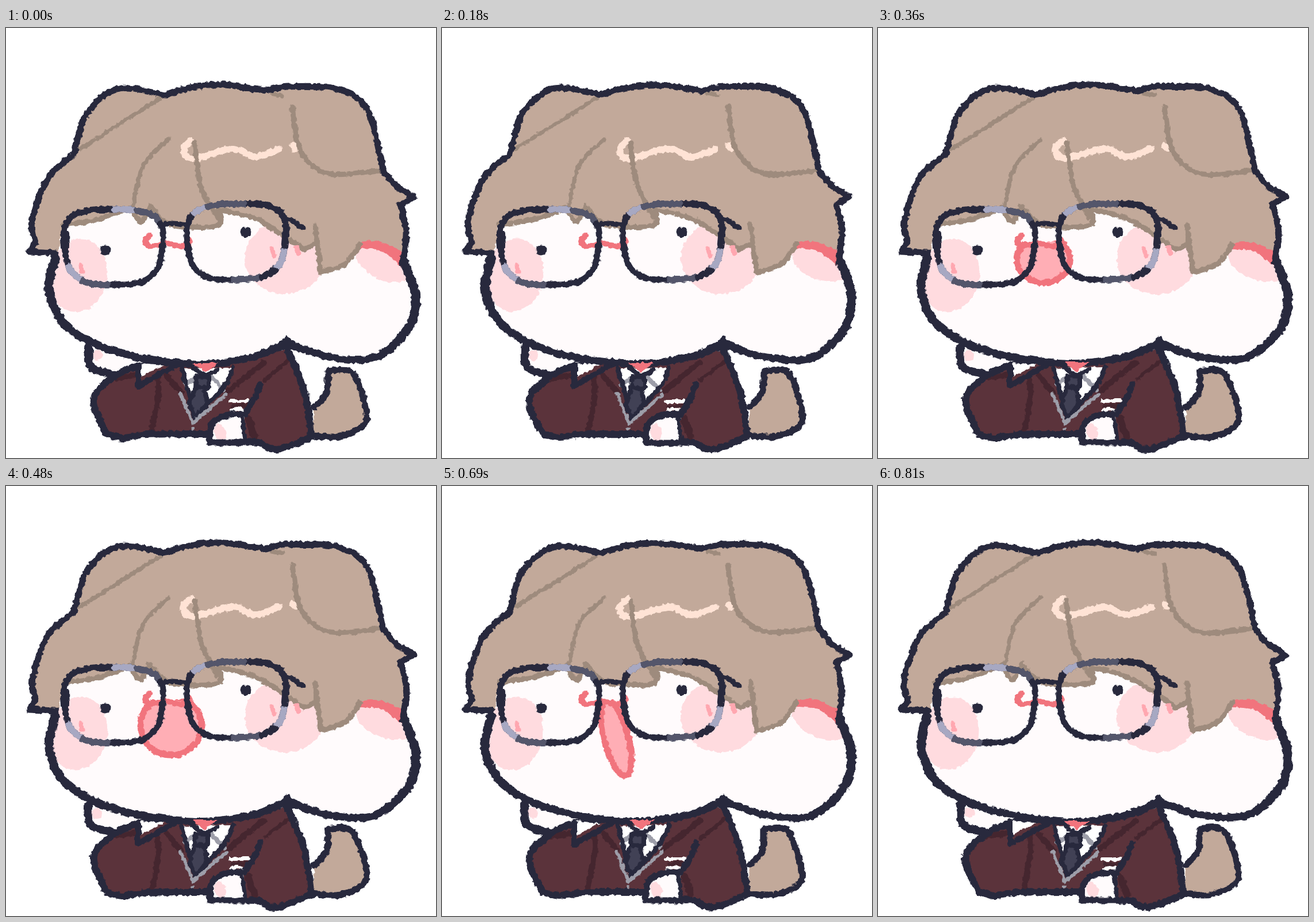
An HTML page with a canvas that plays this animation: 748x748 px, repeating every 0.87 s.

```html
<!DOCTYPE html>
<html lang="en">
<head>
<meta charset="utf-8">
<title>Chatty puppy</title>
<style>
html, body { margin: 0; width: 100%; height: 100%; overflow: hidden; background: #fff; }
canvas { display: block; width: 748px; height: 748px; }
</style>
</head>
<body>
<canvas id="stage" width="748" height="748"></canvas>
<script>
const SIZE = 748, LOOP = 870, BOIL = 180, TAU = Math.PI * 2;
const INK = '#28293d', HAIR = '#c2a99a', SHADE = '#9e8b7d', SKIN = '#fffbfc', BLUSH = '#ffdbdf',
  RED = '#f1747d', PINK = '#ffaeb5', COAT = '#5b333b', FOLD = '#45262f', TIE = '#414155',
  GRAY = '#9d9ea9', GLINT = '#a7a8c2', RIM = '#54566b', CREAM = '#ffe3d5';

// Smooth curve through "x,y" points; "|" marks a sharp corner.
function trace(spec) {
  const path = new Path2D();
  let last = null;
  for (const part of spec.split('|')) {
    const pts = part.split(' ').map(p => p.split(',').map(Number));
    if (last) pts.unshift(last);
    else path.moveTo(...pts[0]);
    for (let i = 0; i < pts.length - 1; i++) {
      const a = pts[i], b = pts[i + 1], before = pts[i - 1] || a, after = pts[i + 2] || b;
      path.bezierCurveTo(
        a[0] + (b[0] - before[0]) / 6, a[1] + (b[1] - before[1]) / 6,
        b[0] - (after[0] - a[0]) / 6, b[1] - (after[1] - a[1]) / 6, b[0], b[1]);
    }
    last = pts[pts.length - 1];
  }
  return path;
}

function layer() {
  const canvas = document.createElement('canvas');
  canvas.width = canvas.height = SIZE;
  const ctx = canvas.getContext('2d', { willReadFrequently: true });
  ctx.lineCap = ctx.lineJoin = 'round';
  return ctx;
}

const fill = (ctx, color, spec) => { ctx.fillStyle = color; ctx.fill(trace(spec)); };
function line(ctx, color, width, ...specs) {
  ctx.strokeStyle = color;
  ctx.lineWidth = width;
  for (const spec of specs) ctx.stroke(trace(spec));
}
function oval(ctx, color, x, y, rx, ry, tilt = 0) {
  ctx.fillStyle = color;
  ctx.beginPath();
  ctx.ellipse(x, y, rx, ry, tilt, 0, TAU);
  ctx.fill();
}

function noise(seed, cell) {
  const cols = Math.ceil(SIZE / cell) + 2;
  let s = seed * 7919 + 17;
  const grid = Float32Array.from({ length: cols * cols }, () => {
    s = (Math.imul(s, 1664525) + 1013904223) >>> 0;
    return s / 2147483648 - 1;
  });
  return (x, y) => {
    const u = x / cell, v = y / cell, i = u | 0, j = v | 0, fx = u - i, fy = v - j, n = j * cols + i;
    const top = grid[n] + (grid[n + 1] - grid[n]) * fx;
    const low = grid[n + cols] + (grid[n + cols + 1] - grid[n + cols]) * fx;
    return top + (low - top) * fy;
  };
}

// Ragged brush edges: every pixel is fetched from a slightly shifted place.
function roughen(source, seed, sway) {
  const fineX = noise(seed, 4), fineY = noise(seed + 50, 4);
  const wideX = noise(seed + 100, 48), wideY = noise(seed + 150, 48);
  const from = new Uint32Array(source.getImageData(0, 0, SIZE, SIZE).data.buffer);
  const out = layer(), image = out.createImageData(SIZE, SIZE);
  const to = new Uint32Array(image.data.buffer);
  const clamp = n => Math.max(0, Math.min(SIZE - 1, Math.round(n)));
  for (let y = 0, i = 0; y < SIZE; y++) {
    for (let x = 0; x < SIZE; x++, i++) {
      const sx = clamp(x + fineX(x, y) * 2.2 + wideX(x, y) * sway);
      const sy = clamp(y + fineY(x, y) * 2.2 + wideY(x, y) * sway);
      to[i] = from[sy * SIZE + sx];
    }
  }
  out.putImageData(image, 0, 0);
  return out.canvas;
}

function drawTail(ctx) {
  const tail = '535,660 557,635 560,597|600,598 622,645|625,688 580,711 533,709';
  fill(ctx, HAIR, tail);
  line(ctx, INK, 11, tail);
}

function drawCoat(ctx) {
  const coat = '490,560|518,630 531,711|472,733 440,721|355,718|352,706|' +
    '245,707 205,713 175,706|152,645 192,603 228,588|300,575';
  const paw = '144,555 148,590 185,602|228,587|225,555';
  fill(ctx, SKIN, paw);
  oval(ctx, BLUSH, 159, 569, 9, 10);
  line(ctx, INK, 14, '144,555 148,590 185,602');
  fill(ctx, COAT, coat);
  line(ctx, FOLD, 10, '190,609 224,604', '264,608 265,640 254,700', '280,605 305,634', '448,582 385,632');
  line(ctx, FOLD, 7, '492,579 450,612', '395,658 420,657');
  line(ctx, INK, 12, coat);
  fill(ctx, '#fff', '232,583|275,586|232,608');
  line(ctx, INK, 10, '230,585 230,623|300,583');
}

function drawShirt(ctx) {
  const vee = '306,592 329,678|380,622 395,590';
  const tie = '330,606|352,607|352,624|346,630|351,652|330,679|319,654|329,625|330,606';
  fill(ctx, '#fff', vee);
  line(ctx, GRAY, 8, '312,620 326,611', '356,606 379,629');
  line(ctx, INK, 8, vee, '326,592 346,603 368,594');
  fill(ctx, TIE, tie);
  line(ctx, INK, 8, tie, '330,625 350,626');
  line(ctx, GRAY, 6, '304,636 325,688|383,637');
  oval(ctx, GRAY, 324, 697, 3, 3);
  line(ctx, '#fff', 6, '390,649 422,649', '393,665 403,662 413,665');
}

function drawHand(ctx) {
  const hand = '355,721 359,689 385,673 415,672';
  line(ctx, FOLD, 13, '422,680 432,710');
  fill(ctx, SKIN, hand + '|415,721');
  oval(ctx, BLUSH, 373, 703, 10, 15, -.3);
  line(ctx, INK, 11, hand + '|432,645 442,620', '355,721 440,721');
  line(ctx, INK, 7, '411,678 416,716');
}

function drawFace(ctx) {
  const jaw = '85,400 76,460 110,522 200,565 330,584 430,572 489,548|560,572 642,573 700,523 712,463 691,404';
  const face = jaw + '|690,300|95,310';
  fill(ctx, SKIN, face);
  ctx.save();
  ctx.clip(trace(face));
  oval(ctx, BLUSH, 126, 430, 50, 64, .18);
  oval(ctx, BLUSH, 485, 400, 70, 63);
  oval(ctx, BLUSH, 662, 404, 55, 35, .36);
  ctx.restore();
  // A sideways shift thickens the cheeks but not the chin.
  for (const shift of [-2, 2]) {
    ctx.save();
    ctx.translate(shift, 0);
    line(ctx, INK, 12, jaw);
    ctx.restore();
  }
  fill(ctx, INK, '465,561|489,535|512,560');
  fill(ctx, RED, '324,582|369,582|345,598');
}

function drawHair(ctx) {
  const head = '86,391|40,389|51,373|46,335 72,262 118,219|137,154 172,116 210,104 278,116|320,104 380,99 450,109|' +
    '490,102 575,106 628,142 656,249|680,276 709,294|686,307|696,355 690,408';
  const fringe = '616,376|590,411 547,425|541,374|518,386|440,335 370,316|367,344 285,341 250,310|234,337 216,312|160,333 100,342';
  fill(ctx, HAIR, head + '|652,382 ' + fringe + '|90,392');
  fill(ctx, RED, '617,373 650,372 690,389|689,413 655,389 617,384');
  line(ctx, CREAM, 12, '322,196 309,212 326,227 393,210 432,224 475,211', '499,205 503,210');
  line(ctx, SHADE, 7, '283,194 239,240 221,310', '128,210 180,178 268,122', '462,114 480,118');
  line(ctx, SHADE, 9, fringe, '537,342 541,374', '328,200 340,275 368,330', '498,137 512,213 560,253 653,247');
  line(ctx, INK, 11, head);
}

// Rounded lens outline between two angles in degrees.
function rim(ctx, color, [cx, cy, tilt], from = 0, to = 360) {
  const n = 3.1, taper = .08;
  ctx.beginPath();
  for (let deg = from; deg <= to; deg++) {
    const c = Math.cos(deg * TAU / 360), s = Math.sin(deg * TAU / 360);
    const r = (Math.abs(c) ** n + Math.abs(s) ** n) ** (-1 / n);
    const x = 85 * r * c * (1 - taper * r * s);
    ctx.lineTo(cx + x, cy + 66 * r * s + x * tilt);
  }
  ctx.strokeStyle = color;
  ctx.lineWidth = 11;
  ctx.lineCap = 'butt';
  ctx.stroke();
  ctx.lineCap = 'round';
}

function drawGlasses(ctx) {
  const left = [187, 381, 0], right = [401, 372, -.03];
  rim(ctx, INK, left);
  rim(ctx, INK, right);
  rim(ctx, GLINT, left, -92, -68);
  rim(ctx, RIM, left, -68, -37);
  rim(ctx, RIM, left, 94, 130);
  rim(ctx, GLINT, left, 130, 155);
  rim(ctx, GLINT, right, -138, -122);
  rim(ctx, RIM, right, -122, -79);
  rim(ctx, GLINT, right, 13, 40);
  rim(ctx, RIM, right, 62, 97);
  line(ctx, INK, 14, '102,358 103,382');
  line(ctx, INK, 9, '271,343 290,339 313,342', '479,325 517,347');
}

function drawMouth(ctx, [x, y, rx, ry, tilt]) {
  ctx.save();
  ctx.beginPath();
  ctx.rect(0, 371, SIZE, SIZE);
  ctx.clip();
  oval(ctx, PINK, x, y, rx, ry, tilt);
  ctx.strokeStyle = RED;
  ctx.lineWidth = 11;
  ctx.stroke();
  ctx.restore();
}

function drawFeatures(ctx, mouth) {
  line(ctx, '#ffa7b0', 9, '131,414 132,424', '463,386 467,397', '505,382 508,391');
  if (mouth) drawMouth(ctx, mouth);
  line(ctx, RED, 10, '250,362 241,371 252,380 270,376', '279,373 305,380 317,377 319,369');
  for (const [x, y] of [[173, 386], [417, 355]]) oval(ctx, INK, x, y, 9.5, 8.5);
  drawGlasses(ctx);
}

// Mouth poses: centre, radii, tilt.
const small = [286, 385, 28, 16, 0], half = [288, 403, 46, 40, 0],
  wide = [287, 417, 53, 51, 0], tall = [303, 438, 21, 68, -.25];
const between = (a, b) => a.map((v, i) => (v + b[i]) / 2);
const mouths = [null, small, null, half, between(half, wide), wide, between(wide, tall), tall, null];

// A new mouth every 105 ms, snapped to 30 ms ticks.
const mouthStart = i => Math.floor((75 + 105 * (i - 1)) / 30) * 30;

const art = layer();
for (const draw of [drawTail, drawCoat, drawShirt, drawHand, drawFace, drawHair]) draw(art);
const puppies = Array.from({ length: Math.ceil(LOOP / BOIL) }, (_, i) => roughen(art, i + 1, 1));
const features = mouths.map(mouth => {
  const ctx = layer();
  drawFeatures(ctx, mouth);
  return roughen(ctx, 9, .4);
});

const stage = document.getElementById('stage').getContext('2d');
function render(now) {
  const t = now % LOOP;
  const pose = features.findLastIndex((_, i) => i === 0 || mouthStart(i) <= t);
  stage.fillStyle = '#fff';
  stage.fillRect(0, 0, SIZE, SIZE);
  stage.drawImage(puppies[Math.floor(t / BOIL)], 0, 0);
  stage.drawImage(features[pose], 0, 0);
}
function tick() {
  render(performance.now());
  requestAnimationFrame(tick);
}
tick();
</script>
</body>
</html>
```
